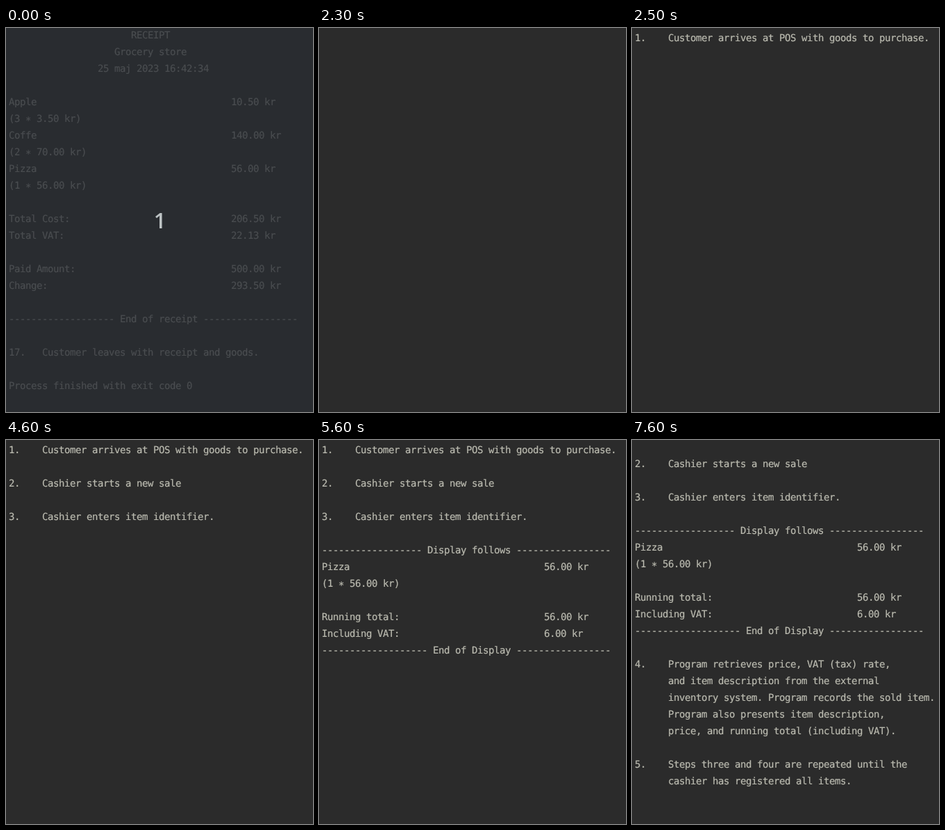
Write an HTML page that moves like this. It is 442 by 552 pixels and loops after 8 s.

```html
<!DOCTYPE html>
<html lang="en">
<head>
<meta charset="utf-8">
<title>Console sale</title>
<style>
  html, body { margin: 0; width: 100%; height: 100%; overflow: hidden; background: #2b2b2b; }
  svg { display: block; width: 442px; height: 552px; }
  .line {
    font: 14px "DejaVu Sans Mono", "Noto Sans Mono", monospace;
    letter-spacing: -0.43px;
    text-rendering: geometricPrecision;
    stroke-width: 0.2px;
  }
  #count { font: 600 31px "Open Sans", "Noto Sans", sans-serif; text-anchor: middle; fill: #bdc3c4; }
</style>
</head>
<body>
<svg viewBox="0 0 442 552">
  <rect id="back" width="442" height="552"/>
  <g id="receipt"></g>
  <g id="steps"></g>
  <text id="count" x="221.7" y="288">1</text>
</svg>
<script>
const LOOP = 8000, ROW = 24, LEFT = 4;
const TEXT = '#bbbbb0', DIM_TEXT = '#4a4d50', BACK = '#2b2b2b', DIM_BACK = '#292c30';
const byId = id => document.getElementById(id);
const [back, receipt, steps, count] = ['back', 'receipt', 'steps', 'count'].map(byId);

const indent = (n, s) => ' '.repeat(n) + s;
const pair = (label, value) => label.padEnd(40) + value + ' kr';
const item = (name, qty, price, total) => [pair(name, total), `(${qty} ∗ ${price} kr)`];
const rule = (n, title) => `${'-'.repeat(n)} ${title} ${'-'.repeat(17)}`;
const step = (n, first, ...rest) =>
  [`${n}.`.padEnd(6) + first, ...rest.map(s => indent(6, s))];

const receiptLines = [
  indent(22, 'RECEIPT'),
  indent(19, 'Grocery store'),
  indent(16, '25 maj 2023 16:42:34'),
  '',
  ...item('Apple', 3, '3.50', '10.50'),
  ...item('Coffe', 2, '70.00', '140.00'),
  ...item('Pizza', 1, '56.00', '56.00'),
  '',
  pair('Total Cost:', '206.50'),
  pair('Total VAT:', '22.13'),
  '',
  pair('Paid Amount:', '500.00'),
  pair('Change:', '293.50'),
  '',
  rule(19, 'End of receipt'),
  '',
  ...step(17, 'Customer leaves with receipt and goods.'),
  '',
  'Process finished with exit code 0'
];

// Each block is printed at its time, starting on its row.
const blocks = [
  { at: 2500, row: 0, lines: step(1, 'Customer arrives at POS with goods to purchase.') },
  { at: 3600, row: 2, lines: step(2, 'Cashier starts a new sale') },
  { at: 4600, row: 4, lines: step(3, 'Cashier enters item identifier.') },
  { at: 5600, row: 6, lines: [
    rule(18, 'Display follows'),
    ...item('Pizza', 1, '56.00', '56.00'),
    '',
    pair('Running total:', '56.00'),
    pair('Including VAT:', '6.00'),
    rule(19, 'End of Display')
  ] },
  { at: 6500, row: 14, lines: step(4,
    'Program retrieves price, VAT (tax) rate,',
    'and item description from the external',
    'inventory system. Program records the sold item.',
    'Program also presents item description,',
    'price, and running total (including VAT).') },
  { at: 7600, row: 19, lines: ['', ...step(5,
    'Steps three and four are repeated until the',
    'cashier has registered all items.')] }
];

function add(parent, tag) {
  return parent.appendChild(document.createElementNS('http://www.w3.org/2000/svg', tag));
}

function print(parent, lines, baseline) {
  lines.forEach((s, i) => {
    if (!s) return;
    const text = add(parent, 'text');
    text.setAttribute('class', 'line');
    text.setAttribute('x', LEFT);
    text.setAttribute('y', baseline + i * ROW);
    text.textContent = s.replace(/ /g, '\u00a0');
  });
}

function ink(group, color) {
  group.setAttribute('fill', color);
  group.setAttribute('stroke', color);
}

print(receipt, receiptLines, 15);
ink(steps, TEXT);
for (const block of blocks) {
  block.group = add(steps, 'g');
  print(block.group, block.lines, 19 + block.row * ROW);
}

const show = (node, on) => node.setAttribute('visibility', on ? 'visible' : 'hidden');

function draw(t) {
  const dimmed = t < 100;
  back.setAttribute('fill', dimmed ? DIM_BACK : BACK);
  ink(receipt, dimmed ? DIM_TEXT : TEXT);
  show(count, dimmed);
  show(receipt, t < 2300);
  for (const block of blocks) show(block.group, t >= block.at);
  steps.setAttribute('transform', `translate(0 ${t >= 7600 ? -28 : 0})`);
}

const start = performance.now();
function tick() {
  draw((performance.now() - start) % LOOP);
  requestAnimationFrame(tick);
}
draw(0);
requestAnimationFrame(tick);
</script>
</body>
</html>
```
